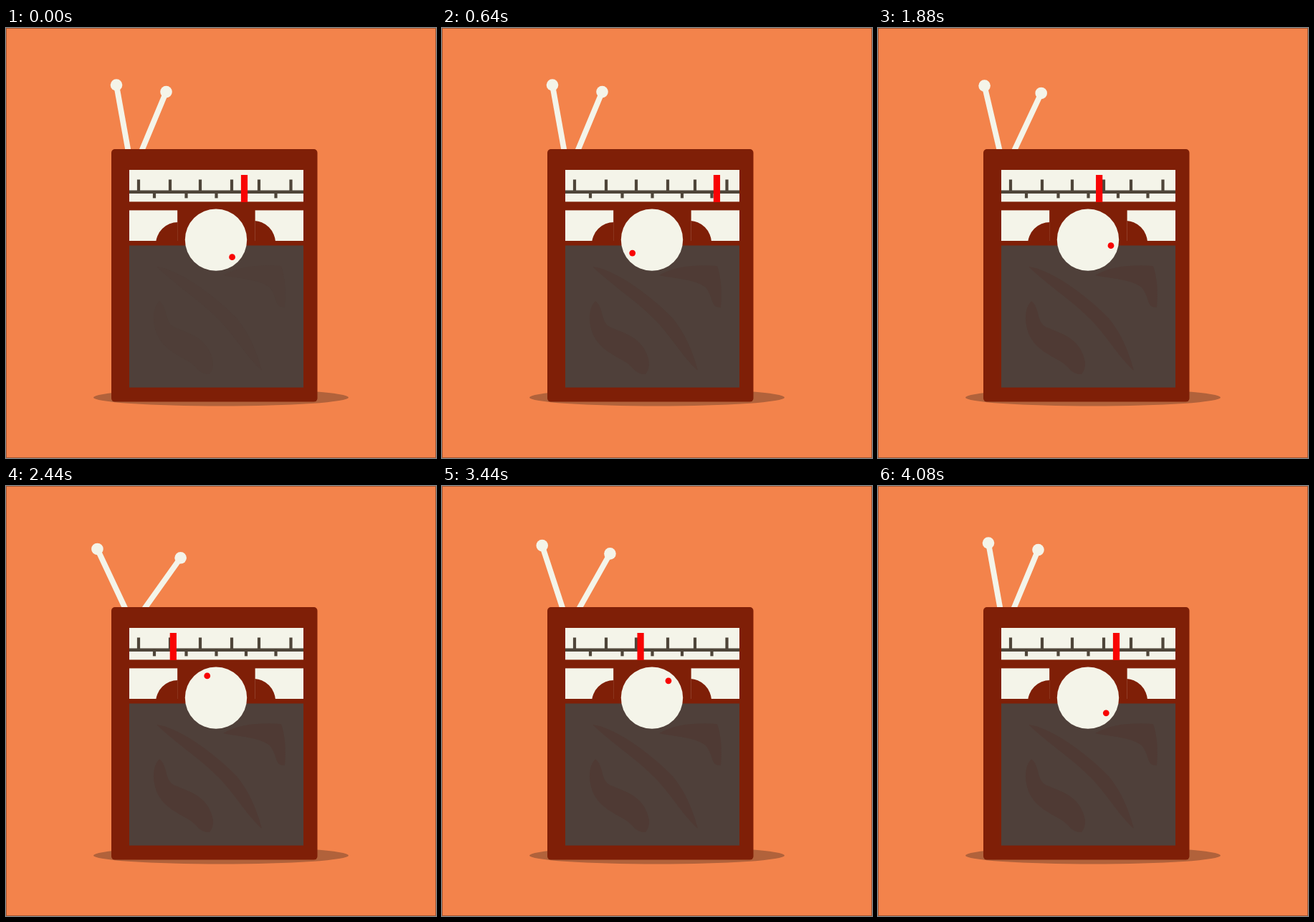
Write an HTML page with a canvas that moves like this. It is 600 by 600 pixels and loops after 4.48 s.

```html
<!DOCTYPE html>
<html lang="en">
<head>
<meta charset="utf-8">
<title>Radio</title>
<style>
html, body { margin: 0; width: 100%; height: 100%; overflow: hidden; background: #f3834b; }
canvas { display: block; }
</style>
</head>
<body>
<canvas id="stage" width="600" height="600"></canvas>
<script>
const ctx = document.getElementById('stage').getContext('2d');
const LOOP = 4480, STEP = 40;
const BROWN = '#7f1f07', CREAM = '#f4f4e9', INK = '#4e4539', RED = '#f80404';
const KNOB = { x: 293, y: 295.6, r: 43.2 };

// Each move: start time, end time, start value, end value.
const NEEDLE = [[0, 973, 332.5, 402.4], [973, 2780, 402.4, 216], [2880, 3965, 216, 332.5]];
const DIAL = [[-154, 965, 40, 173], [965, 2780, 173, -140.7], [2880, 3965, -140.7, 40]];
const SPREAD = [[1580, 2745, 0, 18], [2850, 3940, 18, 0]];

function valueAt(moves, t) {
  let v = moves[0][2];
  for (const [start, end, from, to] of moves) {
    if (t < start) break;
    const u = Math.min(1, (t - start) / (end - start));
    v = from + (to - from) * u * u * (3 - 2 * u);
  }
  return v;
}

function rect(color, x0, y0, x1, y1) {
  ctx.fillStyle = color;
  ctx.fillRect(x0, y0, x1 - x0, y1 - y0);
}

function disc(color, x, y, rx, ry = rx) {
  ctx.fillStyle = color;
  ctx.beginPath();
  ctx.ellipse(x, y, rx, ry, 0, 0, Math.PI * 2);
  ctx.fill();
}

function antenna(x, y, length, degrees) {
  const a = degrees * Math.PI / 180;
  const tx = x + length * Math.sin(a), ty = y - length * Math.cos(a);
  ctx.strokeStyle = CREAM;
  ctx.lineWidth = 7.8;
  ctx.beginPath();
  ctx.moveTo(x, y);
  ctx.lineTo(tx, ty);
  ctx.stroke();
  disc(CREAM, tx, ty, 8.3);
}

function scale() {
  rect(CREAM, 172, 198, 415, 242.4);
  rect(INK, 172, 226.5, 415, 231);
  for (const x of [185, 229, 271, 315, 353, 397.5]) rect(INK, x - 2.1, 211.5, x + 2.1, 227);
  for (const x of [207, 251.5, 293.5, 335, 376.5]) rect(INK, x - 2.1, 231, x + 2.1, 237.4);
}

function windows() {
  for (const [x0, x1, cx, cy] of [[172, 239.4, 240, 302], [347.4, 415, 345, 300]]) {
    ctx.save();
    ctx.beginPath();
    ctx.rect(x0, 254.2, x1 - x0, 42.8);
    ctx.clip();
    rect(CREAM, x0, 254.2, x1, 297);
    disc(BROWN, cx, cy, 31);
    ctx.restore();
  }
}

const stains = [
  'M210 333C240 336 290 372 322 405C340 427 350 452 357 478C338 462 318 428 296 406C268 378 238 360 210 333Z',
  'M214 381C226 390 221 410 234 417C252 425 270 429 281 446C290 460 292 474 284 483C270 484 266 472 256 466C238 456 222 448 213 432C204 416 203 392 214 381Z',
  'M303 345C325 332 355 330 384 332C390 350 391 370 389 390C374 390 380 378 368 362C352 350 325 350 303 345Z'
].map(d => new Path2D(d));

function speaker(t) {
  rect('#4f403a', 172, 303.5, 415, 501.6);
  ctx.globalAlpha = 0.35 + 0.65 * Math.min(1, t / 1000);
  ctx.fillStyle = '#4f3a34';
  for (const stain of stains) ctx.fill(stain);
  ctx.globalAlpha = 1;
}

function knob(degrees) {
  const a = degrees * Math.PI / 180;
  disc(CREAM, KNOB.x, KNOB.y, KNOB.r);
  disc(RED, KNOB.x + 33 * Math.cos(a), KNOB.y + 33 * Math.sin(a), 4.4);
}

function draw(t) {
  rect('#f3834b', 0, 0, 600, 600);
  ctx.strokeStyle = 'rgba(90, 45, 25, 0.5)';
  ctx.lineWidth = 1;
  ctx.strokeRect(0.5, 0.5, 599, 599);

  disc('#b1623b', 300, 515.5, 178, 12);
  const spread = valueAt(SPREAD, t);
  antenna(173, 185, 107.2, -10.2 - spread);
  antenna(184, 184, 102.8, 22.6 + spread * 0.86);

  ctx.fillStyle = BROWN;
  ctx.beginPath();
  ctx.roundRect(147, 169, 287.5, 352.6, 5);
  ctx.fill();

  scale();
  const x = valueAt(NEEDLE, t);
  rect(RED, x - 4.6, 205, x + 4.6, 243);
  windows();
  speaker(t);
  knob(valueAt(DIAL, t));
}

const begin = performance.now();
function tick() {
  const t = (performance.now() - begin) % LOOP;
  draw(Math.floor(t / STEP) * STEP);
  requestAnimationFrame(tick);
}
tick();
</script>
</body>
</html>
```
